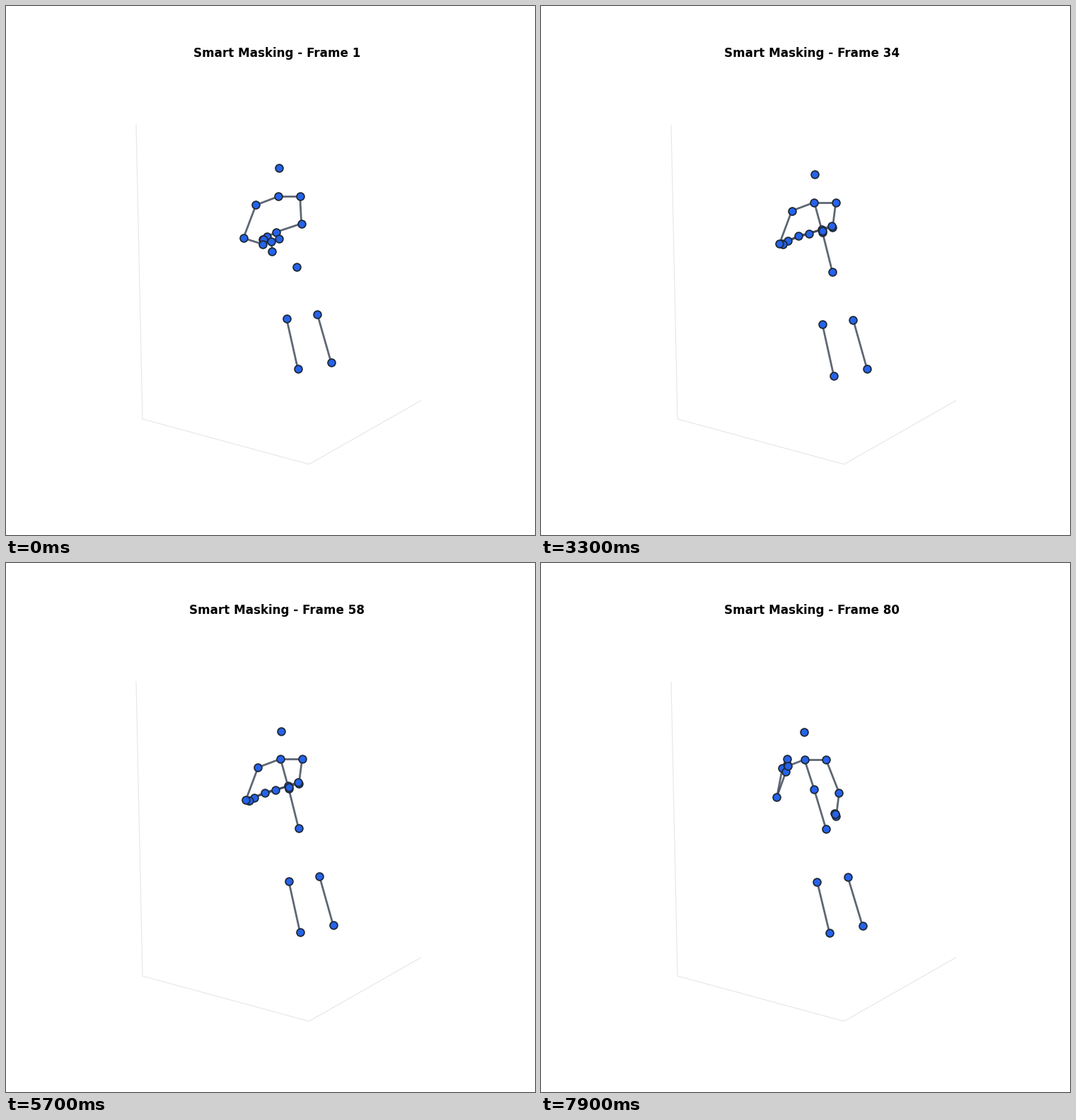
Animation, 748 px wide and 748 px high, one loop 8 s. Source, as a matplotlib script:

```python
import numpy as np
import matplotlib.pyplot as plt
from matplotlib.animation import FuncAnimation
from matplotlib.collections import LineCollection

SIZE, DPI = 748, 100
STEPS, INTERVAL = 80, 100
MASK_END = 8  # the spine joint is hidden until this step

# Standing figure, relative to the pelvis
REST = {
    "pelvis": (0, 0), "spine": (-14, -56), "neck": (-25.5, -98), "head": (-24.5, -137.5),
    "r_shoulder": (-57.3, -86), "l_shoulder": (5, -98),
    "r_knee": (-14, 74.5), "l_knee": (29.5, 68),
    "r_foot": (2, 147), "l_foot": (49, 137.3),
}

# Pelvis path
ROOT_TIMES = [0, 16, 47, 67, 73, 79]
ROOT = [(410.7, 368.7), (411.5, 377.8), (412.2, 374), (415.2, 376), (410, 381), (403, 376)]

# Elbow, wrist and fingertip of each arm pose, relative to the pelvis
START = {"l": [(7, -61), (-29, -49), (-48, -39)],
         "r": [(-75, -40.5), (-48, -32), (-25, -39.5)]}
CROSSED = {"l": [(0.5, -63), (-48, -50.5), (-71, -39.5)],
           "r": [(-74.5, -40), (-32.5, -54), (-0.5, -65)]}
RAISED = {"l": [(5.5, -58), (-46.5, -42), (-71.5, -30)],
          "r": [(-73.5, -39.5), (-42, -65), (-30, -82)]}
LOWERED = {"l": [(18.5, -51), (14.5, -18.5), (12, -22)],
           "r": [(-69.5, -45), (-56.5, -81.5), (-54.5, -99)]}
ARM_TIMES = [0, 16, 57, 67, 79]
ARM_POSES = [START, CROSSED, CROSSED, RAISED, LOWERED]

BONES = [("neck", "l_shoulder"), ("neck", "r_shoulder"), ("neck", "spine"),
         ("spine", "pelvis"), ("r_knee", "r_foot"), ("l_knee", "l_foot")]
for s in "lr":
    chain = [f"{s}_{part}" for part in ("shoulder", "elbow", "wrist", "hand", "tip")]
    BONES += list(zip(chain, chain[1:])) + [(f"{s}_hand", f"{s}_thumb")]


def ease(t, start, end):
    u = np.clip((t - start) / (end - start), 0, 1)
    return u * u * (3 - 2 * u)


def blend(times, values, t):
    """Ease from one key value to the next."""
    values = np.asarray(values, float)
    out = values[0]
    for k in range(1, len(times)):
        out = out + ease(t, times[k - 1], times[k]) * (values[k] - values[k - 1])
    return out


def pose(t):
    root = blend(ROOT_TIMES, ROOT, t)
    stretch = 1 - ease(t, 0, 16)
    lean = ease(t, 66, 79)
    joints = {}
    for name, (x, y) in REST.items():
        shear = 0.05 if y < 0 else 0.02
        joints[name] = root + (x + lean * shear * y, y - 0.015 * stretch * abs(y))
    for side in "lr":
        poses = [p[side] for p in ARM_POSES]
        elbow, wrist, tip = root + blend(ARM_TIMES, poses, t)
        if side == "l":
            hand = wrist + 0.65 * (tip - wrist)
            thumb = tip + (1, 0.5)
        else:
            hand = wrist + 0.55 * (tip - wrist)
            thumb = hand + (1, 2 + 12 * stretch)
        parts = dict(elbow=elbow, wrist=wrist, hand=hand, tip=tip, thumb=thumb)
        joints.update({f"{side}_{part}": p for part, p in parts.items()})
    if t < MASK_END:
        del joints["spine"]
    return joints


fig = plt.figure(figsize=(SIZE / DPI, SIZE / DPI), dpi=DPI, facecolor="white")
ax = fig.add_axes([0, 0, 1, 1])
ax.set(xlim=(0, SIZE), ylim=(SIZE, 0))
ax.axis("off")

ax.plot([184, 193, 428.5, 586.5], [168.5, 584, 648, 558], color="#e6e6e6", lw=0.8)
bones = LineCollection([], colors="#374151", linewidths=2, alpha=0.8,
                       capstyle="projecting", zorder=2)
ax.add_collection(bones)
dots = ax.scatter([], [], s=60, c="#2563eb", edgecolors="#1f2937",
                  linewidths=1.3, zorder=3)
title = ax.text(383, 72, "", ha="center", va="baseline", fontsize=12.1,
                fontweight="bold", family="DejaVu Sans", color="black")


def draw(i):
    joints = pose(i)
    bones.set_segments([(joints[a], joints[b]) for a, b in BONES
                        if a in joints and b in joints])
    dots.set_offsets(np.array(list(joints.values())))
    title.set_text(f"Smart Masking - Frame {i + 1}")
    return bones, dots, title


anim = FuncAnimation(fig, draw, frames=STEPS, interval=INTERVAL,
                     repeat=True, repeat_delay=0, blit=False)
plt.show()
```
